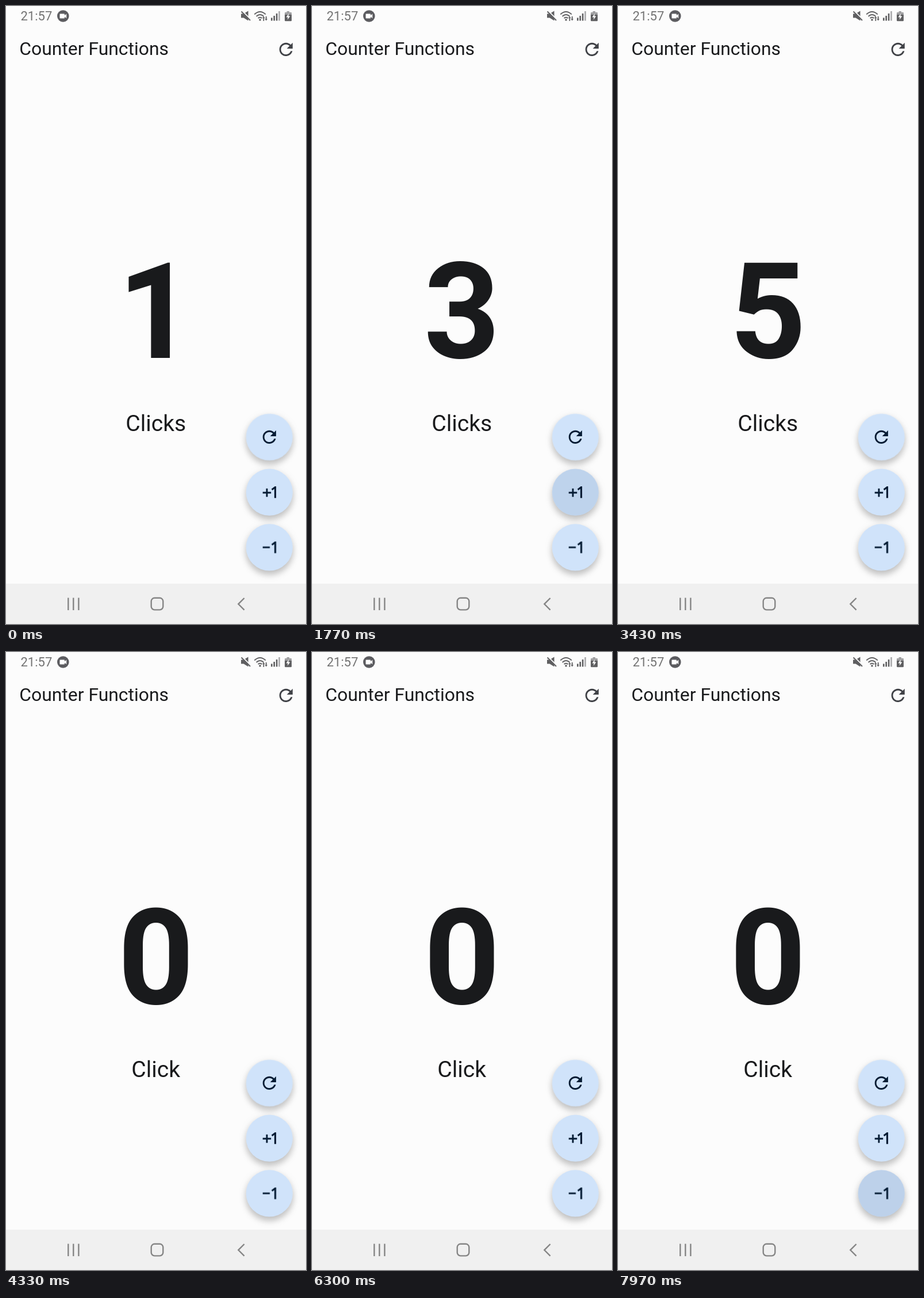
Write an HTML page that moves like this. It is 522 by 1073 pixels and loops after 8000 ms.

```html
<!DOCTYPE html>
<html lang="en">
<head>
<meta charset="utf-8">
<title>Counter Functions</title>
<style>
  html, body { margin: 0; width: 100%; height: 100%; overflow: hidden; background: #fcfcfc; }
  svg { display: block; width: 100%; height: 100%; overflow: hidden; }
  text { font-family: Roboto, sans-serif; fill: #191a1c; }

  .clock { font-size: 22px; fill: #737373; }
  .title { font-size: 31.9px; }
  .digit { font-size: 231.5px; font-weight: 700; text-anchor: middle; }
  .word { font-size: 39.15px; text-anchor: middle; }

  .face { fill: #d0e3fa; filter: drop-shadow(0 7px 6px rgb(0 0 0 / .2)) drop-shadow(0 2px 7px rgb(0 0 0 / .08)); }
  .icon { fill: #061c34; }
  .ink { fill: #0a2a55; opacity: 0; animation: press 8s linear infinite; }
  .held { animation-name: hold; }

  /* Stacked one stage apart: only one line of each strip is in view. */
  .digits { animation: count 8s step-end infinite; }
  .words { animation: singular 8s step-end infinite; }

  @keyframes count {
    0% { transform: translateY(0); }
    12.375% { transform: translateY(-1073px); }
    20.5% { transform: translateY(-2146px); }
    29% { transform: translateY(-3219px); }
    37.25% { transform: translateY(-4292px); }
    49%, 100% { transform: translateY(-5365px); }
  }
  @keyframes singular {
    0% { transform: translateY(0); }
    49%, 100% { transform: translateY(-1073px); }
  }
  @keyframes press {
    0%, 3.25%, 100% { opacity: 0; }
    1%, 1.9% { opacity: .135; }
  }
  @keyframes hold {
    0%, 98.875% { opacity: 0; }
    100% { opacity: .135; }
  }
</style>
</head>
<body>
<svg viewBox="0 0 522 1073">
  <defs>
    <path id="refresh" d="M17.65 6.35C16.2 4.9 14.21 4 12 4c-4.42 0-7.99 3.58-7.99 8s3.57 8 7.99 8c3.73 0 6.84-2.55 7.73-6h-2.08c-.82 2.33-3.04 4-5.65 4-3.31 0-6-2.69-6-6s2.69-6 6-6c1.66 0 3.14.69 4.22 1.78L13 11h7V4z"/>
    <path id="one" d="M17.9 19V8.1l-2.4 1.7-1.1-1.7L18.5 5h1.6v14z"/>
    <circle id="disc" r="40.6"/>
  </defs>

  <!-- status bar -->
  <text class="clock" x="25.5" y="25">21:57</text>
  <circle cx="99.3" cy="17.5" r="10.3" fill="#5c5c60"/>
  <path fill="#fff" d="M94.5 13.5h6.5q1 0 1 1v1.8l3.2-2.6v7.6l-3.2-2.6v1.8q0 1-1 1h-6.5q-1 0-1-1v-6q0-1 1-1z"/>
  <g fill="#5f5f61">
    <path d="M409 13.5h4.5l8-5v17l-8-5H409z"/>
    <path d="M411 8.5l16 16" stroke="#fcfcfc" stroke-width="2"/>
    <path d="M409.5 9.5l15.500 15.500" stroke="#5f5f61" stroke-width="1.9"/>
    <g fill="none" stroke="#5f5f61" stroke-width="1.9">
      <path d="M432.3 14.5q9.700-9 19.400 0"/>
      <path d="M435.6 18q6.400-6 12.800 0"/>
      <path d="M438.6 21.300q3.400-3 6.800 0"/>
    </g>
    <circle cx="442" cy="24" r="1.8"/>
    <path d="M446 21l2.300-3 2.300 3h-1.400v5h-1.800v-5zM450.400 22.500h1.400V18h1.800v4.500h1.400l-2.300 3z"/>
    <path d="M461 20.500h2.600v5H461zM465.400 17h2.600v8.500h-2.600zM469.800 13h2.600v12.500h-2.600z"/>
    <path d="M474.200 9h2.600v16.500h-2.600z" fill="#a9a9ab"/>
    <path d="M488.500 9h4.500v2h3q1 0 1 1v4h-12v-4q0-1 1-1h2.500z" fill="#a0a0a2"/>
    <path d="M485 15h12v10q0 1.200-1.200 1.200h-9.600q-1.200 0-1.200-1.200z"/>
    <path d="M492 13l-4.500 6.500h3l-.8 4.500 4.700-6.500h-3z" fill="#fff"/>
  </g>

  <!-- app bar -->
  <text class="title" x="23.2" y="85">Counter Functions</text>
  <use href="#refresh" fill="#404247" transform="translate(469.8 58) scale(1.45)"/>

  <!-- counter -->
  <g class="digits">
    <text class="digit" x="260.8" y="611">1</text>
    <text class="digit" x="260.8" y="1684">2</text>
    <text class="digit" x="260.8" y="2757">3</text>
    <text class="digit" x="260.8" y="3830">4</text>
    <text class="digit" x="260.8" y="4903">5</text>
    <text class="digit" x="260.8" y="5976">0</text>
  </g>
  <g class="words">
    <text class="word" x="260.7" y="738">Clicks</text>
    <text class="word" x="260.7" y="1811">Click</text>
  </g>

  <!-- floating buttons -->
  <g transform="translate(458.3 748.4)">
    <use href="#disc" class="face"/>
    <use href="#disc" class="ink" style="animation-delay: 3860ms"/>
    <use href="#refresh" class="icon" transform="scale(1.45) translate(-12 -12)"/>
  </g>
  <g transform="translate(458.3 844.2)">
    <use href="#disc" class="face"/>
    <use href="#disc" class="ink" style="animation-delay: 930ms"/>
    <use href="#disc" class="ink" style="animation-delay: 1580ms"/>
    <use href="#disc" class="ink" style="animation-delay: 2260ms"/>
    <use href="#disc" class="ink" style="animation-delay: 2920ms"/>
    <g class="icon" transform="scale(1.45) translate(-12 -12)">
      <path d="M10 8H8v4H4v2h4v4h2v-4h4v-2h-4z" transform="translate(0 -.5)"/>
      <use href="#one"/>
    </g>
  </g>
  <g transform="translate(458.3 939.9)">
    <use href="#disc" class="face"/>
    <use href="#disc" class="ink held"/>
    <g class="icon" transform="scale(1.45) translate(-12 -12)">
      <path d="M4 11h8.5v2H4z"/>
      <use href="#one"/>
    </g>
  </g>

  <!-- navigation bar -->
  <path d="M0 1003h522v70H0z" fill="#f0f0f0"/>
  <g fill="none" stroke="#858585" stroke-width="2.4">
    <path d="M108.3 1027.5V1049M117.3 1027.5V1049M126.4 1027.5V1049"/>
    <rect x="252.7" y="1027.800" width="20.6" height="20.6" rx="5.8"/>
    <path d="M414.6 1028l-10.300 10.300 10.300 10.300"/>
  </g>
</svg>
</body>
</html>
```
